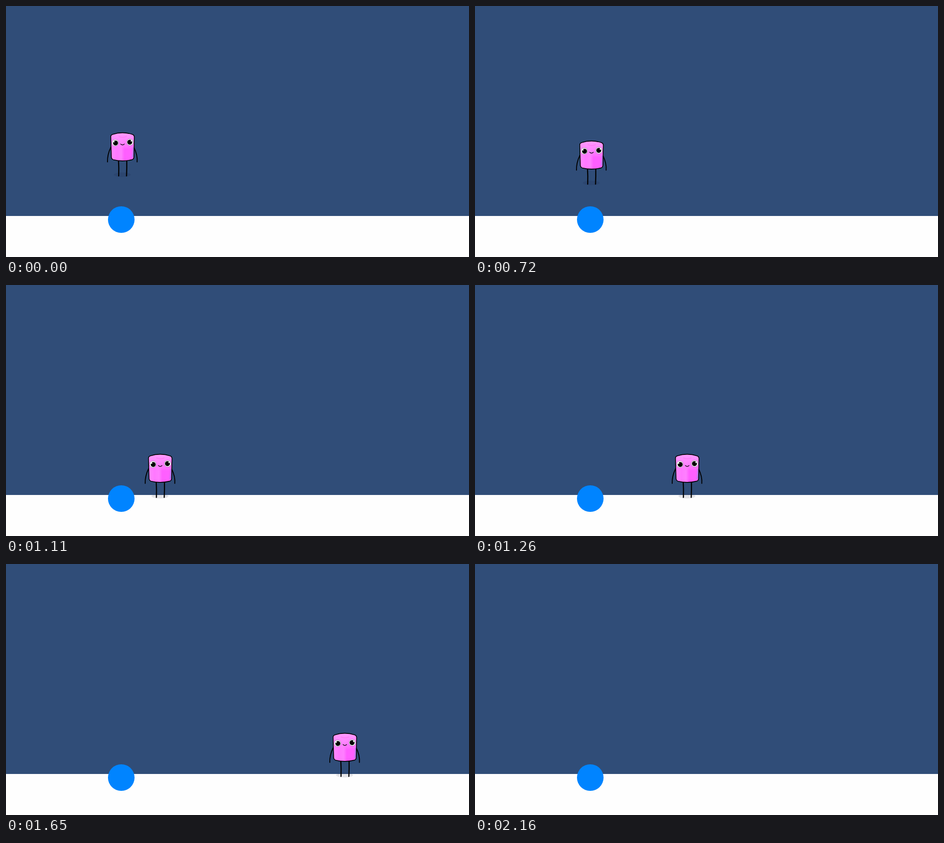
An HTML page that plays this animation: 958x520 px, repeating every 4380 ms.

```html
<!DOCTYPE html>
<html lang="en">
<head>
<meta charset="utf-8">
<title>Falling jelly</title>
<style>
  html, body { margin: 0; width: 100%; height: 100%; overflow: hidden; background: #304d78; }
  svg { display: block; width: 958px; height: 520px; }
  .line { fill: none; stroke: #000; stroke-linecap: round; stroke-linejoin: round; }
</style>
</head>
<body>
<svg viewBox="0 0 958 520">
  <defs>
    <linearGradient id="skin">
      <stop offset="0" stop-color="#ff8cff"/>
      <stop offset=".25" stop-color="#ff78ff"/>
      <stop offset=".45" stop-color="#ff80ff"/>
      <stop offset=".58" stop-color="#ff5eff"/>
      <stop offset=".9" stop-color="#ff60ff"/>
      <stop offset="1" stop-color="#d873f6"/>
    </linearGradient>
    <linearGradient id="sheen" x2="0" y2="1">
      <stop offset="0" stop-color="#ff9cff"/>
      <stop offset=".3" stop-color="#ff88ff" stop-opacity=".9"/>
      <stop offset=".5" stop-color="#ff80ff" stop-opacity=".5"/>
      <stop offset=".6" stop-color="#ff70ff" stop-opacity="0"/>
    </linearGradient>
    <path id="body" d="M216.8 271Q216.8 267.3 220.5 266Q241 259.3 261.5 266Q265.5 267.6 265.5 271.5
      L264.6 313Q264.4 317 261 318.4Q241 323.4 222 318.4Q218.3 317 218 313Z"/>
  </defs>
  <rect width="958" height="435" fill="#304d78"/>
  <rect y="435" width="958" height="85" fill="#fefefe"/>
  <circle cx="238.5" cy="442.5" r="27.5" fill="#0084ff"/>

  <g id="hero">
    <ellipse cx="240.5" cy="349.5" rx="17.5" ry="4.7" fill="#101028" opacity=".1"/>
    <g class="line" stroke-width="2.3">
      <path d="M232.8 320Q233.8 336 233.2 352"/>
      <path d="M249.9 320Q250.2 336 249.4 352"/>
      <path stroke-width="1.9" d="M217 292.5Q209.5 308 210 323"/>
      <path stroke-width="1.9" d="M264.5 292.5Q272.5 309 271.3 323"/>
    </g>
    <use href="#body" fill="url(#skin)"/>
    <use href="#body" fill="url(#sheen)"/>
    <path d="M262 293L263.8 293L263.3 312L260.5 314Q262 304 262 293Z" fill="#b27cf0"/>
    <path d="M233 270Q241 274 250 270" fill="none" stroke="#ff80f6" stroke-width="2"/>
    <use href="#body" class="line" stroke-width="1.6"/>
    <g fill="#fff" stroke="#604068" stroke-width=".5">
      <circle cx="226" cy="283.5" r="6.9"/>
      <circle cx="256.5" cy="282.2" r="6.9"/>
    </g>
    <circle cx="226.6" cy="283.8" r="5.1"/>
    <circle cx="256.1" cy="282.1" r="5.1"/>
    <circle cx="223.4" cy="281.2" r="1.3" fill="#fff"/>
    <circle cx="259.2" cy="279.6" r="1.3" fill="#fff"/>
    <path class="line" stroke-width="1.2" d="M237.2 285.8Q241 289.8 245 285.8"/>
  </g>
</svg>
<script>
const LOOP = 4380;
const hero = document.getElementById('hero');

// [time in ms, sideways distance in px]
const slide = [
  [985, 0], [1020, 30], [1050, 30], [1260, 198], [1590, 423],
  [1650, 460], [1920, 623], [2130, 739], [2160, 760]
];

function slideAt(t) {
  if (t <= slide[0][0]) return 0;
  for (let i = 1; i < slide.length; i++) {
    const [t0, x0] = slide[i - 1], [t1, x1] = slide[i];
    if (t <= t1) return x0 + (x1 - x0) * (t - t0) / (t1 - t0);
  }
  return slide.at(-1)[1];
}

// Free fall, a short dip into the ground, then rest.
function dropAt(t) {
  if (t < 520) return 0;
  if (t >= 1080) return 88;
  const s = (t - 475) / 1000;
  return Math.min(91, 338 * s * s);
}

// The motion advances in 30 ms steps.
function snap(t) {
  if (t < 520) return 0;
  const base = t < 930 ? 520 : 930;
  return base + Math.floor((t - base) / 30) * 30;
}

function draw(now) {
  const t = snap(now % LOOP);
  const x = Math.round(slideAt(t)), y = Math.round(dropAt(t));
  hero.setAttribute('transform', `translate(${x} ${y})`);
}

let start;
function tick(now) {
  start ??= now;
  draw(now - start);
  requestAnimationFrame(tick);
}
draw(0);
requestAnimationFrame(tick);
</script>
</body>
</html>
```
